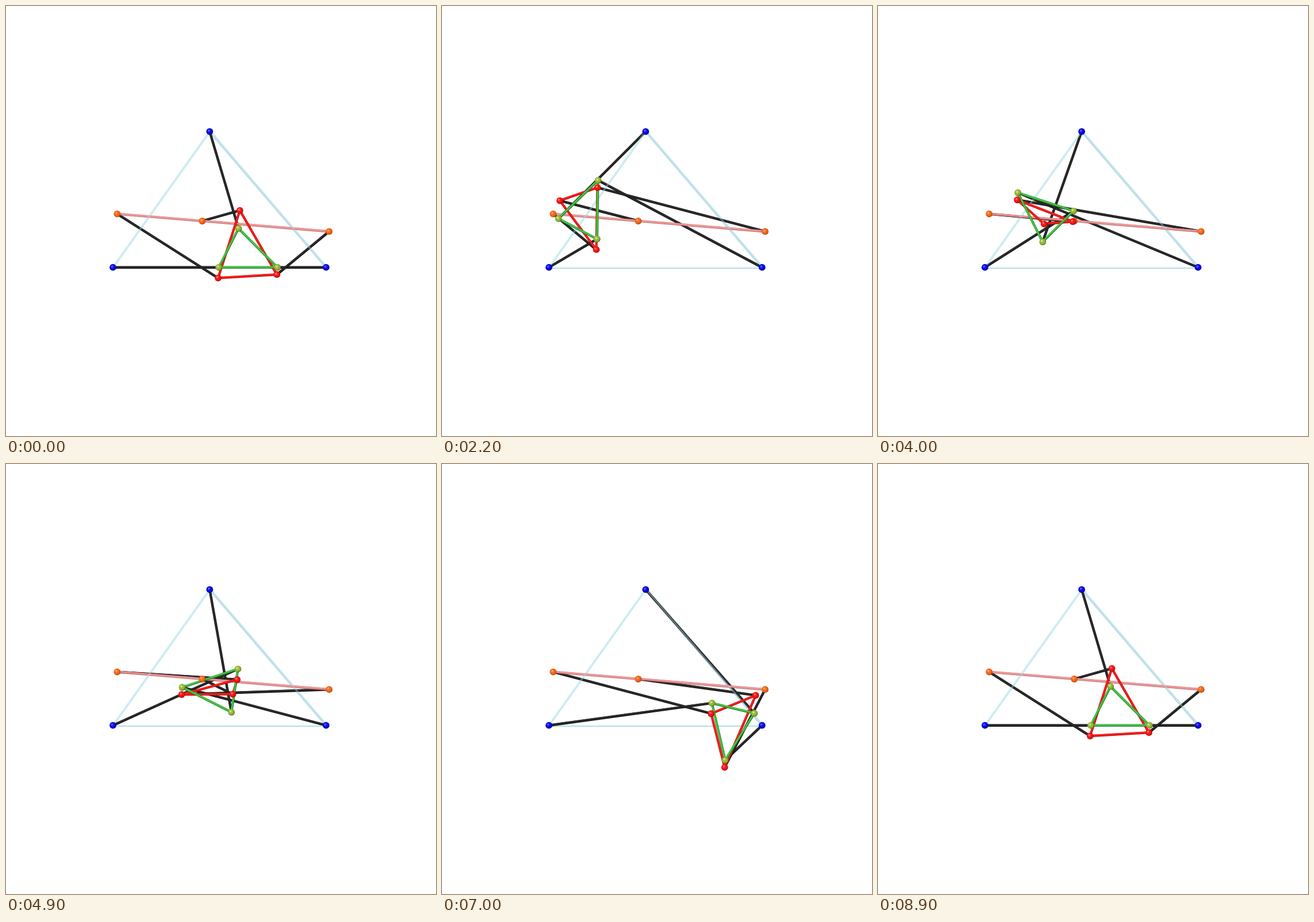
Write an HTML page with a canvas that moves like this. It is 748 px wide and 748 px high and loops after 9000 ms.

```html
<!DOCTYPE html>
<html lang="en">
<head>
<meta charset="utf-8">
<title>Planar linkage</title>
<style>
  html, body { margin: 0; width: 100%; height: 100%; overflow: hidden; background: #fff; }
  canvas { display: block; width: 748px; height: 748px; }
</style>
</head>
<body>
<canvas id="stage" width="748" height="748"></canvas>
<script>
const ctx = document.getElementById('stage').getContext('2d');
const STEP_MS = 100, STEPS = 90;

// Fixed joints
const base = [[186, 454.7], [556.8, 454.7], [354.3, 218.3]];
const rail = [[193.3, 361.6], [562, 392.2], [341.3, 374]];

// Platform corners in its own frame, and the constant shift to the second platform
const corners = [[0, 0], [102, 0], [34.2, 67.8]];
const shifts = [[-1.3, 18.4], [-1, 12.5], [2.4, -31.3]];

// Tubes: edge colour, body colour, width
const tubes = {
  leg: ['#141414', '#2b2b2b', 4.4],
  rail: ['#b96c6c', '#fb9c9c', 4.4],
  red: ['#c40c0c', '#ff1c1c', 4.2],
  green: ['#1f8426', '#46c846', 4.2]
};

// Balls: highlight, body, rim
const balls = {
  blue: ['#6a6aff', '#0808e6', '#00008c'],
  orange: ['#ffb070', '#f4661a', '#9c3c08'],
  red: ['#ff8080', '#f41414', '#9c0404'],
  green: ['#dcee9c', '#93b638', '#4c6614']
};

function line(a, b, color, width, dx = 0, dy = 0) {
  ctx.strokeStyle = color;
  ctx.lineWidth = width;
  ctx.beginPath();
  ctx.moveTo(a[0] + dx, a[1] + dy);
  ctx.lineTo(b[0] + dx, b[1] + dy);
  ctx.stroke();
}

function tube(a, b, kind) {
  const [edge, body, width] = tubes[kind];
  line(a, b, edge, width);
  line(a, b, body, width - 1.6, -0.3, -0.5);
}

function triangle(p, kind) {
  p.forEach((a, i) => tube(a, p[(i + 1) % 3], kind));
}

function ball([x, y], kind) {
  const [light, body, rim] = balls[kind];
  const g = ctx.createRadialGradient(x - 1.6, y - 1.8, 0.3, x - 0.6, y - 0.6, 6.6);
  g.addColorStop(0, light);
  g.addColorStop(0.42, body);
  g.addColorStop(0.7, body);
  g.addColorStop(1, rim);
  ctx.fillStyle = g;
  ctx.beginPath();
  ctx.arc(x, y, 5.9, 0, 2 * Math.PI);
  ctx.fill();
}

function platform(angle) {
  const c = Math.cos(angle), s = Math.sin(angle);
  const x = 371 - 0.8 * c - 101.3 * s;
  const y = 404.4 + 50.3 * c;
  return corners.map(([u, v]) => [x + u * c - v * s, y - u * s - v * c]);
}

function glassFrame() {
  const [left, right, top] = base;
  line(left, top, 'rgba(190,232,240,.62)', 3.6);
  line(left, top, 'rgba(150,200,210,.35)', 1, 1.2, 0.8);
  line(top, right, 'rgba(180,222,232,.7)', 4.2, 0.8, 0);
  line(top, right, 'rgba(120,170,182,.5)', 1, -0.8, 1);
  line(left, right, 'rgba(190,228,235,.6)', 3, 0, 0.9);
  line(left, right, 'rgba(130,180,190,.5)', 1, 0, 1.8);
}

function draw(step) {
  const green = platform(2 * Math.PI * step / (STEPS - 1));
  const red = green.map(([x, y], i) => [x + shifts[i][0], y + shifts[i][1]]);

  ctx.fillStyle = '#fff';
  ctx.fillRect(0, 0, 748, 748);

  // The base line is covered while two legs lie along it
  glassFrame();
  for (let i = 0; i < 3; i++) {
    tube(base[i], green[i], 'leg');
    tube(rail[i], red[i], 'leg');
  }
  ctx.globalAlpha = 0.85;
  tube(rail[0], rail[1], 'rail');
  ctx.globalAlpha = 0.4;
  line(base[0], base[2], '#bfe6ee', 3);
  line(base[2], base[1], '#b4dce6', 3, 0.8, 0);
  ctx.globalAlpha = 1;

  triangle(red, 'red');
  triangle(green, 'green');
  base.forEach(p => ball(p, 'blue'));
  rail.forEach(p => ball(p, 'orange'));
  red.forEach(p => ball(p, 'red'));
  green.forEach(p => ball(p, 'green'));
}

const start = performance.now();
let shown = -1;

function tick() {
  const step = Math.floor((performance.now() - start) / STEP_MS) % STEPS;
  if (step !== shown) draw(shown = step);
  requestAnimationFrame(tick);
}
tick();
</script>
</body>
</html>
```
